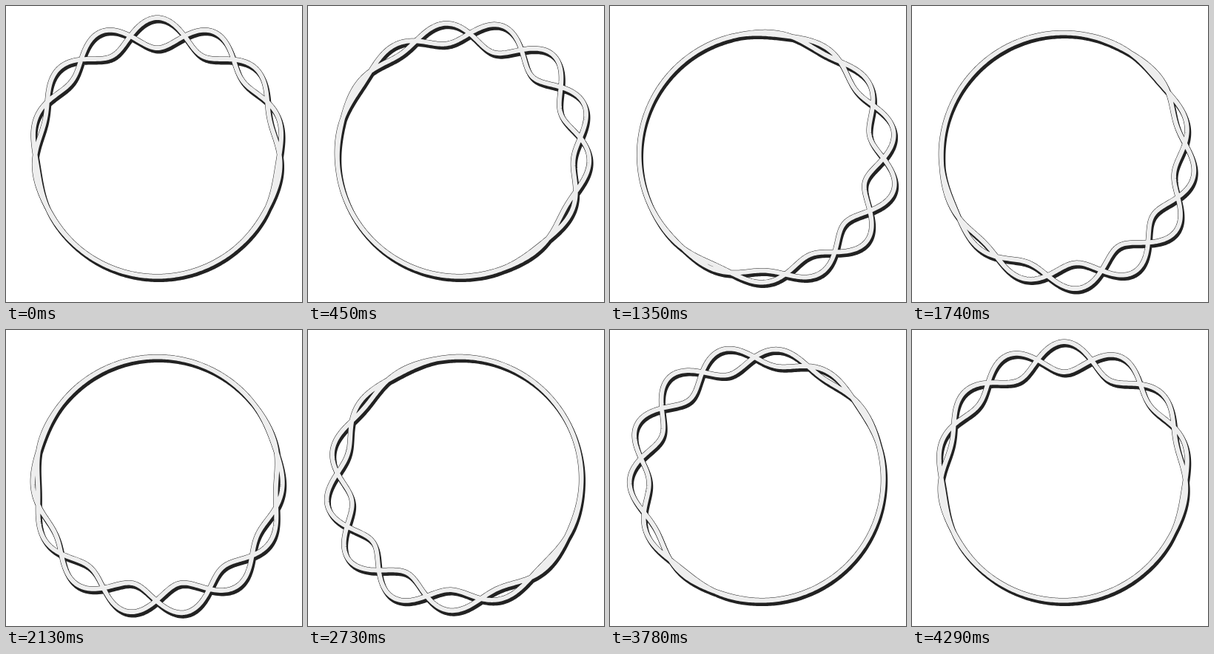
Recreate the animation shown at these times as an HTML page. Size 400 px wide and 401 px high, loop 4.32 s.

```html
<!DOCTYPE html>
<html lang="en">
<head>
<meta charset="utf-8">
<title>Braided ring</title>
<style>
  html, body { margin: 0; width: 100%; height: 100%; overflow: hidden; background: #fff; }
  svg { display: block; width: 100%; height: 100%; }
  use { fill: none; stroke-linejoin: round; }
</style>
</head>
<body>
<svg viewBox="0 0 400 401">
  <defs><path id="braid"/></defs>
  <g stroke="#222" stroke-width="7">
    <use href="#braid" x="2" y="4"/>
    <use href="#braid" x="1" y="2"/>
    <use href="#braid"/>
  </g>
  <use href="#braid" stroke="#eee" stroke-width="6"/>
</svg>
<script>
const LOOP = 4320, STEP = 30;
const CX = 204.5, CY = 201.5, RADIUS = 165, SWING = 20.5;
const WAVES = 7, SAMPLES = 504, TAU = Math.PI * 2;
const braid = document.getElementById('braid');

// Angles run clockwise from the top.
function strand(side, progress) {
  const points = [];
  for (let i = 0; i < SAMPLES; i++) {
    const angle = i / SAMPLES * TAU;
    const envelope = Math.abs(Math.cos((angle - progress * TAU) / 2)) ** 5;
    // The twists drift backwards by three half waves per loop.
    const wave = Math.cos(WAVES * angle + 3 * Math.PI * progress);
    const r = RADIUS + side * SWING * envelope * wave;
    points.push((CX + r * Math.sin(angle)).toFixed(2) + ' ' + (CY - r * Math.cos(angle)).toFixed(2));
  }
  return 'M' + points.join('L') + 'Z';
}

function render(ms) {
  const progress = Math.floor(ms % LOOP / STEP) * STEP / LOOP;
  braid.setAttribute('d', strand(1, progress) + strand(-1, progress));
}

const start = performance.now();
function tick() {
  render(performance.now() - start);
  requestAnimationFrame(tick);
}
tick();
</script>
</body>
</html>
```
